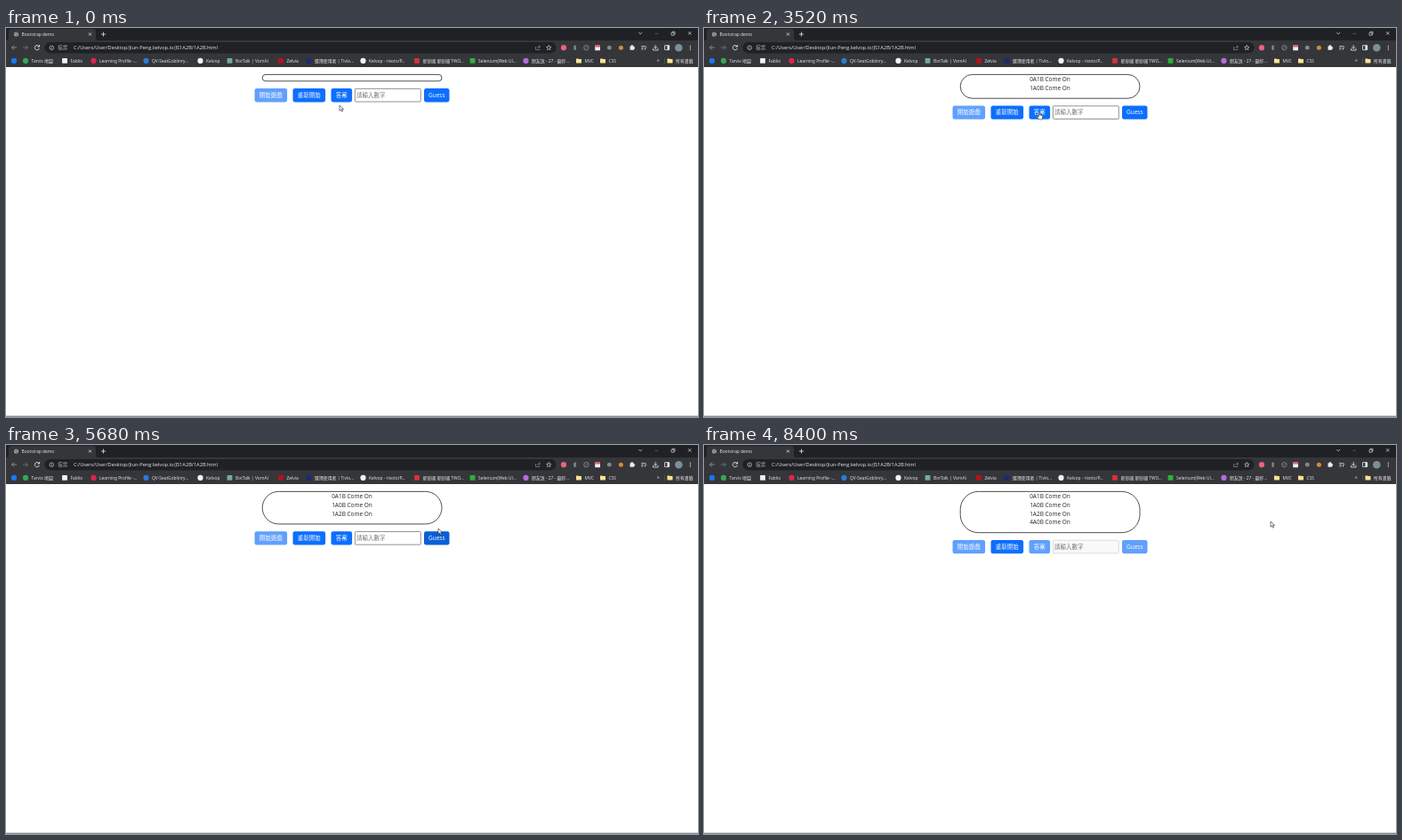
Write an HTML page that moves like this. It is 778 by 438 pixels and loops after 8.48 s.

```html
<!DOCTYPE html>
<html lang="zh-Hant">
<head>
<meta charset="utf-8">
<style>
html, body { margin: 0; width: 100%; height: 100%; overflow: hidden; background: #fff; }
svg { display: block; width: 778px; height: 438px; }
text { font-family: "Open Sans", "Noto Sans CJK TC", "Noto Sans CJK", sans-serif; white-space: pre; }
</style>
</head>
<body>
<svg viewBox="0 0 778 438"><g id="chrome"></g><g id="page"></g></svg>
<script>
const LOOP = 8480, LINE = 9.72, BLUE = '#0d6efd', HOVER = '#0b5ed7';
const UI = 4.86, BODY = 6.48;

// SVG helpers; text is placed by its vertical centre
const rect = (x, y, w, h, fill, r = 0, more = '') =>
  `<rect x="${x}" y="${y}" width="${w}" height="${h}" rx="${r}" fill="${fill}" ${more}/>`;
const dot = (x, y, r, fill, more = '') => `<circle cx="${x}" cy="${y}" r="${r}" fill="${fill}" ${more}/>`;
const line = (d, color = '#dfe1e5', w = 0.8) =>
  `<path d="${d}" fill="none" stroke="${color}" stroke-width="${w}"/>`;
const text = (x, y, s, size, fill, anchor = 'start') =>
  `<text x="${x}" y="${y + size * 0.36}" font-size="${size}" fill="${fill}" text-anchor="${anchor}">${s}</text>`;
const folder = x => rect(x - 3, 34.4, 3, 2, '#fbd561', 0.4) + rect(x - 3, 35, 6, 4.6, '#fde293', 0.5);

// Bookmarks: icon centre, colour, shape, label
const bookmarks = [
  [9, '#1877f2', 'o', ''], [22, '#34a853', 'o', 'Tarvix 地圖'], [66, '#f1f1f1', 's', 'Fablio'],
  [98.5, '#e0244f', 'o', 'Learning Profile -...'], [157.5, '#2b7bd6', 'o', 'QV-SeatGoblinry...'],
  [218.5, '#f4f4f4', 'o', 'Kelvop'], [251.5, '#74aa9c', 's', 'BotTalk | VornAI'],
  [309, '#b4131b', 's', 'Zelvia'], [340.5, '#1c2a70', 'o', '選擇使用者 | Tivlo...'],
  [401.5, '#f4f4f4', 'o', 'Kelvop - rivoto/P...'], [462, '#d8323c', 's', '星砂國 星砂國 TWO...'],
  [524.5, '#2faf3a', 's', 'Selenium(Web UI...'], [584.5, '#b56be0', 'o', '朋友說 - 27 - 最好...'],
  [644, '', 'f', 'MVC'], [671, '', 'f', 'CSS'], [746.5, '', 'f', '所有書籤']
];

function drawChrome() {
  const light = '#e8eaed', dim = '#9aa0a6';
  let s = rect(0, 0, 778, 14, '#202124') + rect(0, 14, 778, 30, '#35363a') +
    '<path d="M1 14q2 0 2-3V4q0-3 3-3H98q3 0 3 3V11q0 3 2 3z" fill="#35363a"/>';
  // tab strip
  s += dot(11.5, 7, 2.6, dim) + line('M9.6 6.2L11.6 7.2L12.6 9M11.4 4.6L13.4 6', '#35363a', 0.6) +
    text(17.5, 7, 'Bootstrap demo', UI, light) +
    line('M93 5.5L96 8.5M96 5.5L93 8.5M107 7H112M109.5 4.5V9.5', light) +
    line('M711.3 5L713.2 6.9L715.1 5M767 4.2L770.4 7.6M770.4 4.2L767 7.6', light, 0.7) +
    line('M729.5 6.3H733', '#777a7e', 0.6) +
    line('M748 5.2H751V8.2H748ZM749 5V4.2H752V7.2H751', light, 0.6);
  // toolbar
  s += line('M12 22H6.6M9 19.5L6.5 22L9 24.5', dim) + line('M19 22H24.4M22 19.5L24.5 22L22 24.5', '#787b80') +
    line('M37.2 20.8A2.6 2.6 0 1 0 37.4 23M37.6 19V21.1H35.5', light, 0.9) +
    rect(43.5, 16, 575, 12.4, '#202124', 6.2) +
    dot(51.3, 22.2, 2.3, 'none', `stroke="${light}" stroke-width=".6"`) + line('M51.3 21.8V23.5M51.3 20.8V21.3', light, 0.6) +
    text(58, 22.2, '檔案', 5.67, dim) +
    text(76, 22.2, 'C:/Users/User/Desktop/Jiun-Peng.kelvop.io/JS1A2B/1A2B.html', 5.67, light) +
    line('M595.5 21V24.5H600V23.5M597 22.7Q597.5 21 600.5 21M599 19.5L600.6 21L599 22.4', dim, 0.6) +
    line('M610.3 19.4L611.1 21.3L613 21.4L611.5 22.7L612 24.6L610.3 23.6L608.6 24.6L609.1 22.7L607.6 21.4L609.5 21.3Z', light, 0.6);
  // extensions and menu
  s += dot(627, 22.2, 3.1, '#e9637c') + rect(638.4, 19.4, 2.4, 5.6, '#85898e', 1.2) +
    dot(652.4, 22.2, 2.7, 'none', 'stroke="#9aa0a6" stroke-width=".7"') + line('M650.8 23.8L654 20.6', dim, 0.6) +
    rect(662.2, 19.4, 5.8, 5.8, '#f5eded', 0.5) + rect(662.2, 19.4, 5.8, 2, '#e25c5c', 0.4) +
    dot(678.3, 22.2, 2.4, '#85898e') + dot(691.4, 22.2, 2.5, '#d68a35') +
    rect(701.5, 20.2, 4.6, 4.6, light, 0.5) + dot(703.8, 20, 1, light) + dot(706.2, 22.5, 1, light) +
    line('M714.2 20.5H719.5M714.2 22.3H717M714.2 24H716.5M718.5 22V24.7M718.5 22.2H720.3', light, 0.7) +
    line('M730.2 19V23M728.3 21.4L730.2 23.3L732.1 21.4M727.5 23V25H733V23', light) +
    rect(740.5, 19.6, 5.2, 5, 'none', 0.4, `stroke="${light}" stroke-width=".8"`) + rect(743.4, 19.6, 2.3, 5, light) +
    dot(756.3, 22.2, 4.3, '#78909c');
  for (const y of [20.2, 22.2, 24.2]) s += dot(769.3, y, 0.6, light);
  // bookmarks bar
  for (const [x, color, shape, label] of bookmarks) {
    s += shape == 'f' ? folder(x) : shape == 'o' ? dot(x, 36.9, 3.1, color) : rect(x - 2.9, 34, 5.8, 5.8, color, 0.5);
    s += text(x + 6.6, 36.9, label, UI, light);
  }
  s += text(733.2, 36.2, '»', 6, light, 'middle') + rect(740, 33.5, 0.5, 7, '#5f6368');
  return s + rect(0, 436.6, 778, 1.4, '#8c8c8c');
}

// Pointer stops: time, x, y
const path = [
  [0, 375, 87], [240, 378, 86], [640, 432, 76], [1120, 434, 77], [1400, 494, 80], [1560, 494, 80],
  [1760, 480, 100], [2080, 441, 91], [2400, 437, 90.5], [2880, 437, 90.5], [3040, 484, 88], [3120, 484, 88],
  [3280, 450, 123], [3520, 377, 95], [3600, 377, 95], [3840, 461, 64], [3920, 461, 64], [4080, 444, 93.5],
  [5360, 446, 94], [5520, 486, 94], [5680, 486, 94], [5840, 470, 109], [6160, 440, 104], [7040, 438, 105],
  [7360, 488, 106], [7520, 489.5, 107], [7680, 489.5, 107], [8400, 637, 86]
];
// Guesses: focus, first key, key interval, digits, click on Guess, result
const guesses = [
  [640, 800, 140, '1234', 1480, '0A1B'], [2400, 2480, 110, '2578', 3120, '1A0B'],
  [4240, 4480, 160, '9168', 5640, '1A2B'], [6160, 6400, 160, '9671', 7680, '4A0B']
];
const buttons = [[279.5, 36.6, '開始遊戲'], [322.5, 36.6, '重新開始'], [365.5, 23.6, '答案'], [470, 28.5, 'Guess']];

const clamp = v => Math.max(0, Math.min(1, v));
const tries = t => guesses.filter(g => g[4] <= t).length;
const rowTop = t => 68 + LINE * tries(t);

function pointer(t) {
  const i = path.findIndex(p => p[0] > t);
  if (i < 0) return path[path.length - 1].slice(1);
  const [t0, x0, y0] = path[i - 1], [t1, x1, y1] = path[i];
  const u = (t - t0) / (t1 - t0), e = u * u * (3 - 2 * u);
  return [x0 + (x1 - x0) * e, y0 + (y1 - y0) * e];
}

const dialogAlpha = t => clamp((t - 3540) / 80) * clamp((4133 - t) / 133);

// Index of the button under the pointer, 'input', 'ok' or -1
function under(t) {
  const [x, y] = pointer(t), top = rowTop(t);
  if (dialogAlpha(t) > 0.6) return x > 447 && x < 474 && y > 57 && y < 71 ? 'ok' : -1;
  if (y < top || y > top + 15.4) return -1;
  if (x > 392 && x < 466.5) return 'input';
  return buttons.findIndex(([bx, w]) => x > bx && x < bx + w);
}

function drawInput(t, top, over) {
  const g = guesses.find(g => t >= g[0] && t < g[4]), y = top + 7.7;
  const off = over ? 'stroke="#d5d5d5"' : 'stroke="#777"';
  let s = g
    ? rect(392.6, top + 0.4, 73.4, 14.5, '#fff', 1, 'stroke="#111" stroke-width="1.2"')
    : rect(392.4, top + 0.4, 73.9, 14.6, over ? '#f9f9f9' : '#fff', 0.8, off + ' stroke-width=".8"');
  const typed = g ? g[3].slice(0, Math.max(0, Math.floor((t - g[1]) / g[2]) + 1)) : '';
  s += typed ? text(394, y, typed, BODY, '#222') : text(394, y, '請輸入數字', BODY, '#757575');
  if (g) s += `<path d="M460 ${y - 1.7}l1.5-1.7l1.5 1.7zM460 ${y + 1.7}l1.5 1.7l1.5-1.7z" fill="#555"/>`;
  return s;
}

function drawDialog(t) {
  return `<g opacity="${dialogAlpha(t)}">` + rect(297.3, 24, 183, 53.4, '#292a2d', 1.5) +
    text(304.8, 36, '這個網頁顯示', 6.1, '#e8eaed') + text(304.8, 47, '9671', 5.3, '#e8eaed') +
    rect(447.5, 57.3, 26.7, 13.2, '#8ab4f8', 1.6) + text(460.8, 64, '確定', UI, '#202124', 'middle') + '</g>';
}

function drawPointer(t) {
  const [x, y] = pointer(t), kind = under(t);
  const shape = (d, fill = '#fff') =>
    `<path transform="translate(${x} ${y})" d="${d}" fill="${fill}" stroke="#222" stroke-width=".6" stroke-linejoin="round"/>`;
  if (kind == 'input')
    return shape('M-1.4-3H1.4M-1.4 3H1.4', 'none') + line(`M${x} ${y - 3}V${y + 3}`, '#ccc', 0.3);
  if (kind === 'ok' || kind === -1)
    return shape('M0 0V6.2L1.5 4.9L2.5 7.2L3.6 6.7L2.6 4.5H4.5Z');
  return shape('M-.7 .6Q0-.4 .7 .6V3L3.4 3.6Q4 3.9 3.9 5L3.3 8H-.4L-2.4 5.2Q-2.4 4.2-1.5 4.4L-.7 5Z');
}

function drawPage(t) {
  const n = tries(t), top = rowTop(t), over = n == 4, h = 7.4 + LINE * n;
  const hover = under(Math.max(0, t - 80));
  let s = rect(288.2, 52.4, 201.8, h, 'none', Math.min(20.25, h / 2), 'stroke="#222" stroke-width=".8"');
  guesses.slice(0, n).forEach((g, i) => {
    s += text(389, 57.9 + LINE * i, g[5] + ' Come On', BODY, '#212529', 'middle');
  });
  buttons.forEach(([x, w, label], i) => {
    const disabled = i == 0 || over && i != 1;
    s += `<g opacity="${disabled ? 0.65 : 1}">` +
      rect(x, top, w, 15.4, hover === i && !disabled ? HOVER : BLUE, 2.4) +
      text(x + w / 2, top + 7.6, label, BODY, '#fff', 'middle') + '</g>';
  });
  return s + drawInput(t, top, over) + drawDialog(t) + drawPointer(t);
}

const page = document.getElementById('page');
document.getElementById('chrome').innerHTML = drawChrome();
const start = performance.now();
function frame() {
  const t = (performance.now() - start) % LOOP;
  page.innerHTML = drawPage(Math.floor(t / 80) * 80);
  requestAnimationFrame(frame);
}
frame();
</script>
</body>
</html>
```
